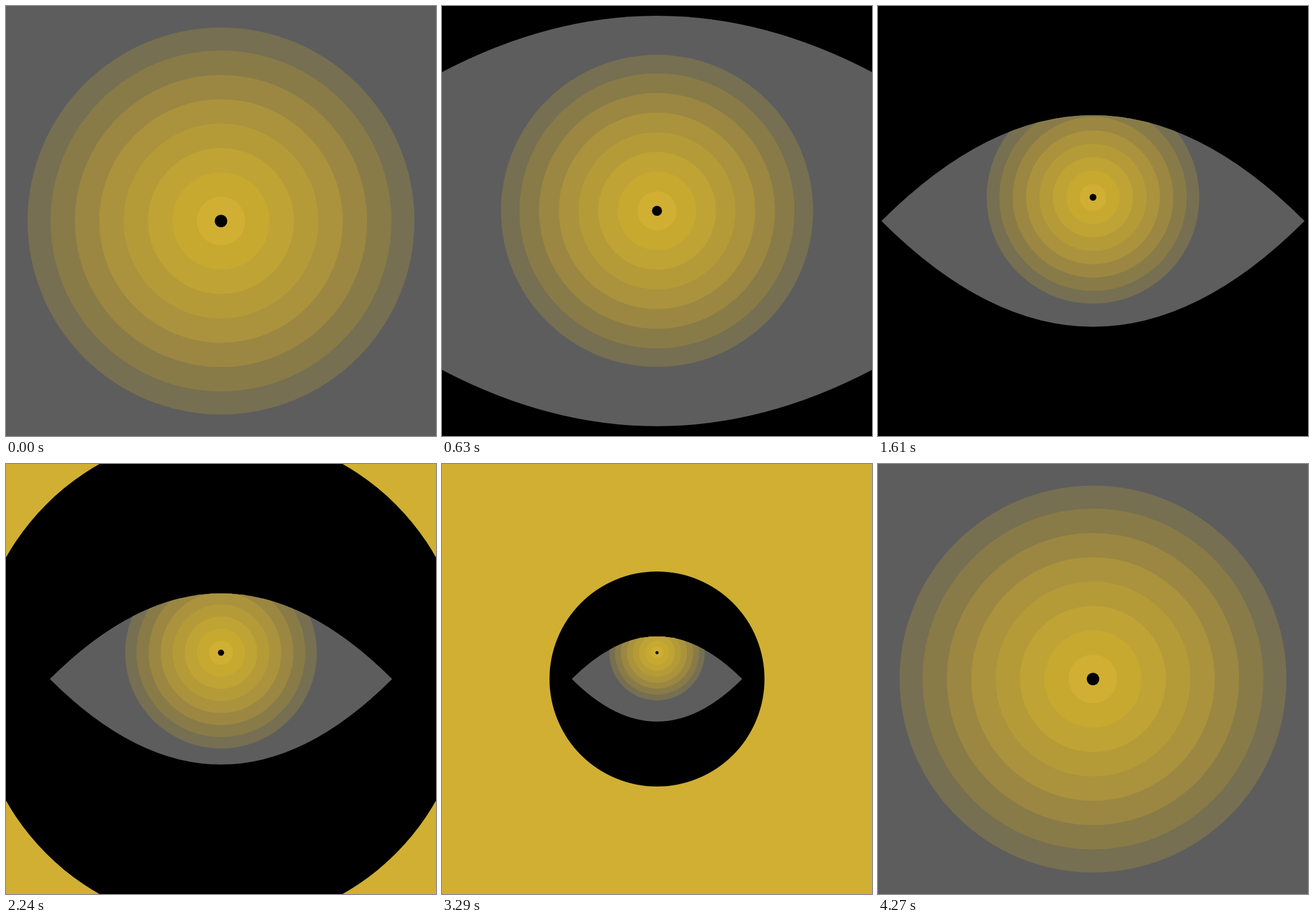
Animation of 748 by 748 pixels, one loop 4340 ms. Source, as an HTML page with a canvas:

```html
<!DOCTYPE html>
<html lang="en">
<head>
<meta charset="utf-8">
<title>Endless eye</title>
<style>
  html, body { margin: 0; width: 100%; height: 100%; overflow: hidden; background: #5d5d5d; }
  canvas { display: block; }
</style>
</head>
<body>
<canvas id="stage" width="748" height="748"></canvas>
<script>
const ctx = document.getElementById('stage').getContext('2d');
const MID = 374, STEP = 70, STEPS = 62;
const GREY = '#5d5d5d';
const RINGS = ['#766f51', '#887b48', '#9b8741', '#aa933c', '#b59b37', '#bfa334', '#c7a930', '#d0af33'];
const IRIS = 336.5, RING = 42.35, PUPIL = 10.8;
const REST = 168; // iris radius where the zoom pauses

// Keys: [step, value, slope]
const irisKeys = [
  [0, IRIS, -6.8], [9, 271.5, -7.4], [15, 229, -6.3], [23, 185, -4.2],
  [31, REST, -0.8], [39, 137.5, -6.3], [47, 83, -6.8], [61, 0, -4]
];
const pupilKeys = [
  [0, 1600, -50], [23, 580, -33], [31, 437, -7],
  [39, 344, -18.6], [47, 187, -19.2], [61, PUPIL, -0.3]
];

// Cubic Hermite interpolation between neighbouring keys
function at(keys, x) {
  const i = Math.max(1, keys.findIndex(k => k[0] >= x));
  const [x0, y0, m0] = keys[i - 1], [x1, y1, m1] = keys[i];
  const d = x1 - x0, u = (x - x0) / d, v = 1 - u;
  return v * v * ((1 + 2 * u) * y0 + u * d * m0) + u * u * ((1 + 2 * v) * y1 - v * d * m1);
}

function disc(y, r, color) {
  ctx.beginPath();
  ctx.arc(MID, y, Math.max(0, r), 0, Math.PI * 2);
  ctx.fillStyle = color;
  ctx.fill();
}

function drawIris(y, scale) {
  RINGS.forEach((color, i) => disc(y, scale * (i ? RING * (8 - i) : IRIS), color));
  disc(y, scale * PUPIL, '#000');
}

function drawEye(w) {
  ctx.beginPath();
  ctx.moveTo(MID - w, MID);
  ctx.quadraticCurveTo(MID, MID - w, MID + w, MID);
  ctx.quadraticCurveTo(MID, MID + w, MID - w, MID);
  ctx.fillStyle = GREY;
  ctx.fill();
}

function draw(now) {
  const step = Math.floor(now / STEP) % STEPS;
  const iris = at(irisKeys, step);
  const eye = iris > REST ? 300 + (iris - REST) * 4 : iris * 1.785;
  const lift = Math.min(45.8, (IRIS - iris) * 0.272);

  ctx.fillStyle = GREY;
  ctx.fillRect(0, 0, 748, 748);
  drawIris(MID, at(pupilKeys, step) / PUPIL);

  // The next eye lives inside the pupil of the previous one
  if (step < STEPS - 1) {
    ctx.save();
    ctx.clip();
    drawEye(eye);
    ctx.clip();
    drawIris(MID - lift, iris / IRIS);
    ctx.restore();
  }
  requestAnimationFrame(draw);
}
requestAnimationFrame(draw);
</script>
</body>
</html>
```
